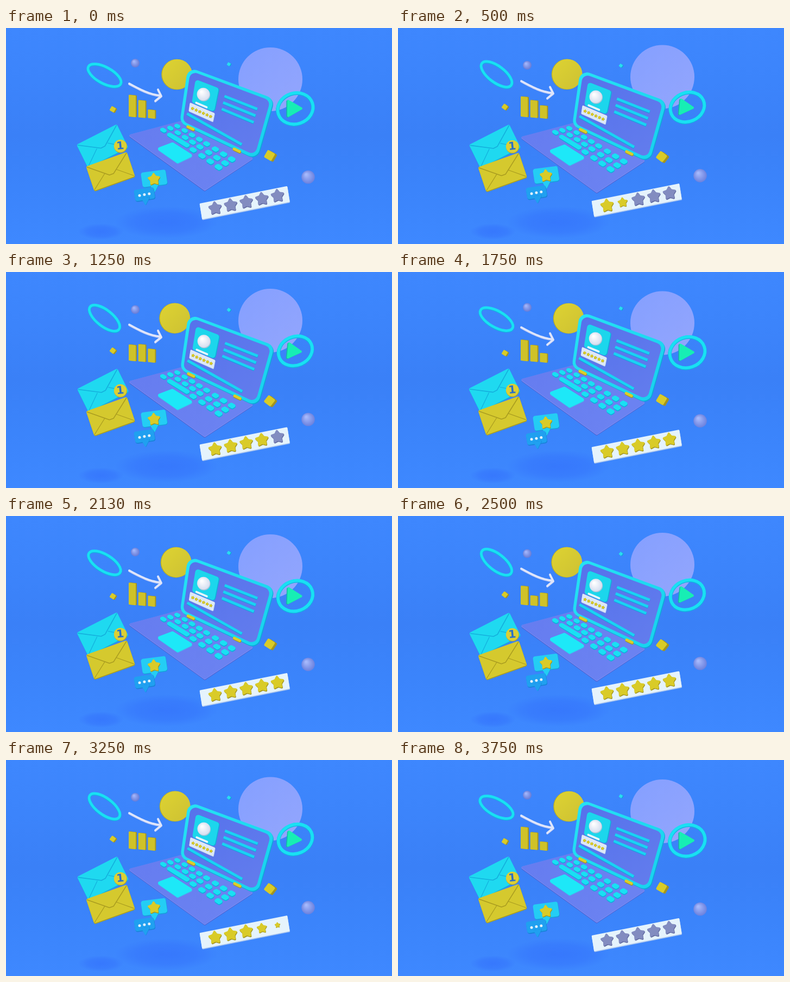
An HTML page with a canvas that plays this animation: 711x400 px, repeating every 3.87 s.

```html
<!DOCTYPE html>
<html lang="en">
<head>
<meta charset="utf-8">
<style>
html, body { margin: 0; width: 100%; height: 100%; overflow: hidden; background: #3b83fb; }
canvas { display: block; width: 711px; height: 400px; }
</style>
</head>
<body>
<canvas id="stage" width="711" height="400"></canvas>
<script>
const ctx = document.getElementById('stage').getContext('2d');
const LOOP = 3870, STEPS = 31, BOB = 15;
const CYAN = '#19e0f3', TEAL = '#10aedb', GOLD = '#d9cb28', BRONZE = '#a39420';
const WHITE = '#e5f3fc', HAZE = '#a9c4ee';
let q = 0;

const mix = (a, b, k) => a + (b - a) * k;
const clamp = (v) => Math.max(0, Math.min(1, v));
const smooth = (v) => v * v * (3 - 2 * v);
const shift = (p, dx, dy) => p.map(([x, y]) => [x + dx, y + dy]);

// Parts drift by dx, dy at the top of the bob.
function drift(dx, dy, paint) {
  ctx.save();
  ctx.translate(dx * q, dy * q);
  paint();
  ctx.restore();
}

// A plane holds four corners; spot() and patch() place things on it.
const plane = (x, y, ux, uy, vx, vy) =>
  [[x, y], [x + ux, y + uy], [x + ux + vx, y + uy + vy], [x + vx, y + vy]];
const spot = (p, u, v) => [0, 1].map((i) => mix(mix(p[0][i], p[1][i], u), mix(p[3][i], p[2][i], u), v));
const patch = (p, u0, v0, u1, v1) => [spot(p, u0, v0), spot(p, u1, v0), spot(p, u1, v1), spot(p, u0, v1)];
const BASE = [[225, 198], [366, 300.5], [456, 241], [322, 172]];
const LID = [[335, 72], [494, 131], [462, 244], [320, 175.5]];

function polygon(x, y, n, radius, turn) {
  return Array.from({ length: n }, (_, i) => {
    const a = turn + i * 2 * Math.PI / n, r = radius(i);
    return [x + r * Math.cos(a), y + r * Math.sin(a)];
  });
}
function shape(p, fill, r = 0) {
  const mid = (a, b) => [(a[0] + b[0]) / 2, (a[1] + b[1]) / 2];
  ctx.beginPath();
  ctx.moveTo(...mid(p[p.length - 1], p[0]));
  p.forEach((c, i) => ctx.arcTo(...c, ...mid(c, p[(i + 1) % p.length]), r));
  ctx.closePath();
  ctx.fillStyle = fill;
  ctx.fill();
}
function slab(p, r, fill, side, dx = .5, dy = 1.5) {
  shape(shift(p, dx, dy), side, r);
  shape(shift(p, dx / 2, dy / 2), side, r);
  shape(p, fill, r);
}
function line(p, color, width, cap = 'round') {
  ctx.beginPath();
  p.forEach(([x, y]) => ctx.lineTo(x, y));
  ctx.lineCap = cap;
  ctx.lineJoin = 'round';
  ctx.strokeStyle = color;
  ctx.lineWidth = width;
  ctx.stroke();
}
function disc(x, y, r, fill) {
  ctx.beginPath();
  ctx.arc(x, y, r, 0, 7);
  ctx.fillStyle = fill;
  ctx.fill();
}
function ball(x, y, r, light, dark) {
  const g = ctx.createRadialGradient(x - r * .3, y - r * .4, r * .1, x, y, r * 1.1);
  g.addColorStop(0, light);
  g.addColorStop(1, dark);
  disc(x, y, r, g);
}
function fade(x0, y0, x1, y1, ...colors) {
  const g = ctx.createLinearGradient(x0, y0, x1, y1);
  colors.forEach((c, i) => g.addColorStop(i / (colors.length - 1), c));
  return g;
}
function ring(x, y, a, b, turn, width) {
  const layer = (dy, color, w) => {
    ctx.beginPath();
    ctx.ellipse(x, y + dy, a, b, turn, 0, 7);
    ctx.strokeStyle = color;
    ctx.lineWidth = w;
    ctx.stroke();
  };
  layer(.8, '#0fb4de', width);
  layer(0, CYAN, width * .85);
}
function star(x, y, r, fill, side, tilt = -.12) {
  const p = polygon(x, y, 10, (i) => i % 2 ? r * .58 : r, tilt - Math.PI / 2);
  slab(p, r * .12, fill, side, r * .06, r * .1);
}
function cube(x, y, s, dy, fill, side) {
  drift(0, dy, () => slab(polygon(x - s * .15, y, 4, () => s, .52 + Math.PI / 4 + q * .15),
    s * .2, fill, side, s * .35, s * .15));
}

function backdrop() {
  ctx.fillStyle = fade(0, 0, 0, 400, '#3e87fe', '#3c84fb', '#3a80f7', '#3b84fb', '#3e88ff');
  ctx.fillRect(0, 0, 711, 400);
  const shadow = (x, y, rx, ry) => {
    ctx.save();
    ctx.translate(x, y);
    ctx.scale(rx, ry);
    const g = ctx.createRadialGradient(0, 0, 0, 0, 0, 1);
    g.addColorStop(0, 'rgba(50,110,252,.6)');
    g.addColorStop(.6, 'rgba(50,110,252,.4)');
    g.addColorStop(1, 'rgba(50,110,252,0)');
    disc(0, 0, 1, g);
    ctx.restore();
  };
  shadow(295, 360, 95, 30);
  shadow(175, 377, 42, 15);
}

function floaters() {
  drift(0, -5, () => disc(487, 95, 59, fade(440, 45, 530, 145, '#86a0ff', '#92a5fd')));
  drift(-4, -.3, () => {
    disc(314.5, 86, 28.3, '#b9ad20');
    disc(315.3, 85.8, 27.8, fade(290, 60, 340, 110, '#ddd232', '#cec233'));
  });
  drift(0, -2.2, () => ring(181.5, 87.5, 33.8, 15, .5 + q * .17, 5.6));
  drift(0, 4.5, () => ball(238, 65, 8, '#a3b6fb', '#6176d4'));
  drift(0, -3, () => ball(556.5, 276, 12.3, '#a6b9fc', '#677ddc'));
  cube(411, 67, 4, 3, '#2adcf0', '#0fa5d6');
  cube(197.5, 150.5, 6.3, -5, GOLD, BRONZE);
  cube(487, 236, 11, 2.5, GOLD, BRONZE);
  drift(0, -3, () => {
    ring(533, 149, 33 - q, 28.5 - q * 2, -.32 - q * .1, 6.6);
    slab(polygon(528, 149, 3, () => 20 - q, q * .1), 2, '#17eeb4', '#12b9a6', -1.6, .8);
  });
  drift(0, -5.5, () => {
    for (const [dy, color] of [[1, '#a9b9f0'], [0, '#dfe6fb']]) {
      const shaft = Array.from({ length: 9 }, (_, i) => [227 + i * 7.2, 103 + dy + 22.5 * Math.sin(i / 8 * 1.4)]);
      line(shaft, color, 3.7);
      line([[280, 114 + dy], [286, 126 + dy], [275, 135 + dy]], color, 3.7);
    }
  });
}

function chart(f) {
  const tops = [
    129 - 6 * Math.cos(2 * Math.PI * (f - 1.2) / BOB),
    133.5 + 13.5 * Math.exp(-(((f - 20) / 4) ** 2)),
    151 - 9 * q
  ];
  tops.forEach((y, n) => slab(plane(226 + n * 17.7, y, 13, 1.4, 0, 164 + n * 1.3 - y), 1, '#cfc228', BRONZE, 2, -.3));
}

function keyboard() {
  const key = (c0, c1, row) => {
    const v = .57 + row * .133 - .058 * (c0 + c1) / 2;
    slab(patch(BASE, .03 + c0 * .78, v - .05, .11 + c1 * .78, v + .05), 3, CYAN, TEAL, .3, 1.8);
  };
  for (const row of [2, 1, 0]) {
    for (let i = 0; i < 8; i++) {
      const c = i < 5 ? i * .135 : .7 + (i - 5) * .15;
      if (row || i < 1 || i > 3) key(c, c, row);
    }
  }
  key(.135, .405, 0);
  slab(patch(BASE, .285, .12, .565, .44), 3, '#1de8f8', '#38c4ee', .3, 1.3);
}

function screen() {
  const bar = (u0, v0, u1, v1) => {
    const p = [spot(LID, u0, v0), spot(LID, u1, v1)];
    line(shift(p, .2, 1), '#159ede', 5.4, 'butt');
    line(p, '#1ad2f3', 4.8, 'butt');
  };
  shape(shift(LID, 1.2, 1.6), '#0da9d6', 15);
  shape(LID, fade(330, 80, 480, 230, '#25e2f4', '#18d2ee'), 15);
  shape(patch(LID, .035, .05, .965, .95), fade(340, 90, 460, 230, '#5672ec', '#627ced'), 11);
  for (let i = 0; i < 3; i++) bar(.46, .25 + i * .11, .85, .25 + i * .11);
  bar(.07, .79, .78, .88);

  slab(patch(LID, .106, .16, .38, .57), 5, '#1cd6ec', TEAL, 1.5, .8);
  const [x, y] = spot(LID, .22, .355);
  disc(x + .8, y + 1.2, 12, '#a9c4d8');
  ball(x, y, 11.7, '#ffffff', '#d3dcef');
  line([spot(LID, .157, .545), spot(LID, .285, .545)], WHITE, 3.8);
  slab(patch(LID, .085, .585, .39, .735), 1.5, '#dce8f8', HAZE, .5, 1);
  for (let i = 0; i < 6; i++) star(...spot(LID, .125 + i * .045, .665), 3.3, GOLD, BRONZE, .3);
}

function laptop() {
  drift(0, 4.5, () => {
    shape(shift(BASE, 0, 2.2), '#4c62d6', 2);
    slab(BASE, 2, fade(250, 190, 400, 280, '#667df0', '#6b82f1'), '#8096f6', 0, .9);
    keyboard();
  });
  drift(1, 5.5, () => {
    screen();
    for (const u of [.14, .74]) {
      const p = [spot(LID, u - .035, 1), spot(LID, u + .035, 1)];
      line(shift(p, .3, 1.2), BRONZE, 5.5);
      line(p, '#dccd2a', 5);
    }
  });
}

function envelope(p, fill, edge, depth) {
  slab(p, 3, fill, edge);
  const on = (u, v) => spot(p, u, v);
  line([on(.02, .96), on(.36, .5)], edge, 1.2);
  line([on(.98, .96), on(.64, .5)], edge, 1.2);
  line([on(.02, .04), on(.45, depth - .03), on(.55, depth - .03), on(.98, .04)], edge, 1.6);
}

function mail() {
  drift(1, .5, () => envelope(plane(130, 216, 74, -38, 21, 43), '#1fd9f0', '#14afdc', .58));
  drift(0, 1.5, () => envelope(plane(147.5, 256.5, 75, -27, 15, 45), '#d5c92e', '#aa9d20', .65));
  drift(0, 1, () => {
    disc(211, 219.3, 12, '#b3a422');
    disc(210.6, 218.5, 11.7, '#dccf35');
    ctx.translate(210.3, 219.3);
    ctx.rotate(-.1);
    ctx.font = 'bold 20px "DejaVu Sans", sans-serif';
    ctx.textAlign = 'center';
    ctx.textBaseline = 'middle';
    ctx.fillStyle = '#2b6fc6';
    ctx.fillText('1', 0, 0);
  });
}

function bubble(p, tipX, tipY, fill, side) {
  slab(p, 4, fill, side, .8, 1.5);
  slab([[tipX - 8, tipY - 14], [tipX + 8, tipY - 16], [tipX, tipY]], 1, fill, side, .6, 0);
}

function chat() {
  drift(0, -7.5, () => {
    bubble(plane(248, 268, 45.5, -6, 4, 27), 273.5, 305, '#24cdf4', '#179fdb');
    star(272.5, 280, 13, GOLD, BRONZE, -.08);
  });
  drift(0, -4, () => {
    bubble(plane(235, 300, 36.5, -5.5, 3.5, 21), 257, 329, '#20a0f0', '#1881d8');
    for (let i = 0; i < 3; i++) disc(246 + i * 8.9, 310.3 - i * 1.7, 2.5, WHITE);
  });
}

// Each star shrinks away, swaps colour, and grows back.
function starState(i, f) {
  const on = (f - 2.5 * i) / .9, off = (f - 25.15 - .5 * (4 - i)) / 1.45;
  if (off > 0) return { lit: off < 1, size: clamp(Math.abs(1 - off)) };
  return { lit: on > 1, size: on < 0 ? 1 : smooth(clamp(Math.abs(1 - on))) };
}

function rating(f) {
  const card = plane(356.5, 325, 161.5, -32.3, 4.7, 29.2);
  drift(0, -5.5, () => {
    slab(card, 1.5, WHITE, HAZE);
    for (let i = 0; i < 5; i++) {
      const { lit, size } = starState(i, f);
      if (size > .03) star(...spot(card, .163 + i * .178, .47), 14 * size, lit ? GOLD : '#828cc0', lit ? BRONZE : '#616aa0');
    }
  });
}

const begin = performance.now();
function draw() {
  const t = (performance.now() - begin) % LOOP;
  const f = Math.floor(t * STEPS / LOOP);
  q = smooth(Math.abs(Math.sin(Math.PI * f / BOB))) / .95;
  backdrop();
  floaters();
  chart(f);
  laptop();
  mail();
  chat();
  rating(f);
  requestAnimationFrame(draw);
}
draw();
</script>
</body>
</html>
```
